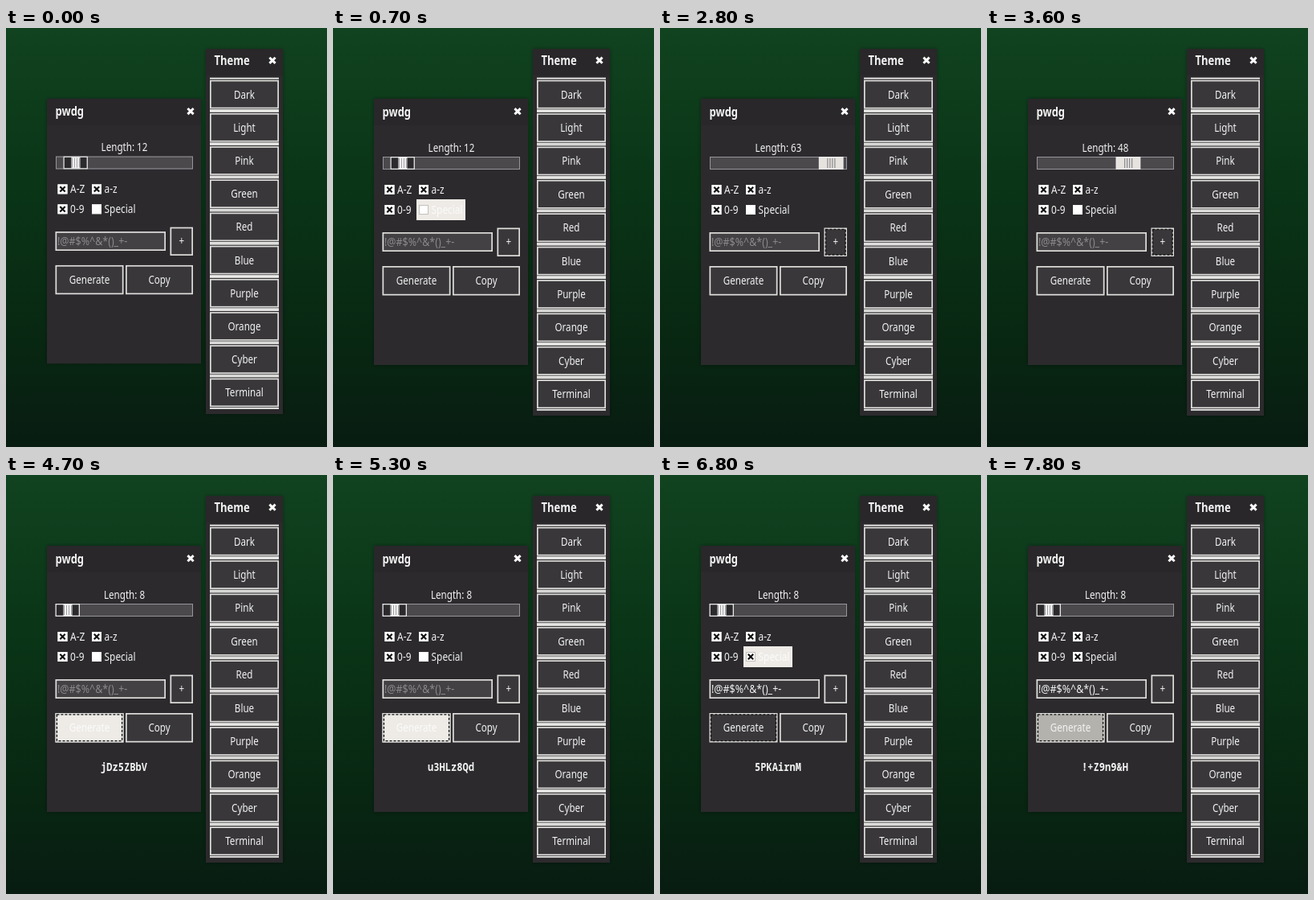
An HTML page with a canvas that plays this animation: 400 px wide and 521 px high, repeating every 8000 ms.

```html
<!DOCTYPE html>
<html lang="en">
<head>
<meta charset="utf-8">
<title>Password generator</title>
<style>
html, body { margin: 0; width: 100%; height: 100%; overflow: hidden; background: #07210f; }
canvas { display: block; width: 400px; height: 521px; }
</style>
</head>
<body>
<canvas id="stage"></canvas>
<script>
const W = 400, H = 521, LOOP = 8000, STEP = 100;
const SQUEEZE = 0.83; // the whole screen is narrowed, so all type is too
const SANS = '"Noto Sans", sans-serif';
const MONO = '"Noto Sans Mono", monospace';
const INK = '#f2f2f2', EDGE = '#dededb', PANEL = '#2c2a2d', BUTTON = '#39373a';
const LIT = '#eeebe7', PRESSED = '#b4b2ad';
const THEMES = ['Dark', 'Light', 'Pink', 'Green', 'Red', 'Blue', 'Purple', 'Orange', 'Cyber', 'Terminal'];

const canvas = document.getElementById('stage');
const ctx = canvas.getContext('2d');
const dpr = window.devicePixelRatio || 1;
canvas.width = W * dpr;
canvas.height = H * dpr;

// [time, slider value], linear between points
const SLIDE = [[0, 12], [1500, 12], [1800, 28], [2000, 37], [2300, 52], [2700, 64],
  [3100, 60], [3400, 51], [3600, 48], [3700, 34], [3800, 34], [3900, 16], [4000, 8]];

// [time, password], each held until the next
const PASSWORDS = [[0, ''], [4700, 'jDz5ZBbV'], [4900, 'q7RmT2xK'], [5100, 'Wb4nYc9E'],
  [5300, 'u3HLz8Qd'], [5500, 'Gk6vPs1J'], [5700, '5PKAirnM'], [7300, 'r&4X_bT7'], [7500, '!+Z9n9&H']];

const between = (t, a, b) => t >= a && t < b;

function sliderAt(t) {
  const i = SLIDE.findIndex(p => p[0] > t);
  if (i < 0) return SLIDE[SLIDE.length - 1][1];
  const [t0, v0] = SLIDE[i - 1], [t1, v1] = SLIDE[i];
  return Math.round(v0 + (v1 - v0) * (t - t0) / (t1 - t0));
}

function buttonState(t) {
  if (between(t, 4600, 4700) || between(t, 7200, 7300) || between(t, 7400, 7500) || t >= 7800) return 'pressed';
  if (between(t, 4800, 5700) && t % 200 === 0) return 'pressed';
  if (between(t, 4400, 5900) || t >= 7100) return 'hover';
  return '';
}

function fill(x, y, w, h, color) {
  ctx.fillStyle = color;
  ctx.fillRect(x, y, w, h);
}

function box(x, y, w, h, color, edge = EDGE, line = 1.7) {
  fill(x, y, w, h, color);
  ctx.strokeStyle = edge;
  ctx.lineWidth = line;
  ctx.strokeRect(x + line / 2, y + line / 2, w - line, h - line);
}

function text(str, x, y, { size = 14, weight = 400, font = SANS, color = INK, align = 'left' } = {}) {
  ctx.save();
  ctx.translate(x, y);
  ctx.scale(SQUEEZE, 1);
  ctx.font = `${weight} ${size}px ${font}`;
  ctx.textAlign = align;
  ctx.fillStyle = color;
  ctx.fillText(str, 0, 0);
  ctx.restore();
}

function cross(x, y, r, width, color) {
  ctx.strokeStyle = color;
  ctx.lineWidth = width;
  ctx.beginPath();
  ctx.moveTo(x - r, y - r);
  ctx.lineTo(x + r, y + r);
  ctx.moveTo(x + r, y - r);
  ctx.lineTo(x - r, y + r);
  ctx.stroke();
}

function panel(x, y, w, h, bar, title, baseline) {
  ctx.save();
  ctx.shadowColor = 'rgba(0,0,0,.35)';
  ctx.shadowBlur = 5 * dpr;
  fill(x, y, w, h, PANEL);
  ctx.restore();
  fill(x, y, w, bar, '#29272a');
  text(title, x + 10.5, baseline, { size: 15.7, weight: 700 });
  cross(x + w - 13, baseline - 5.8, 3.6, 3, '#fff');
}

function button(x, y, w, h, label, state = '', focus = false) {
  const color = state === 'hover' ? LIT : state === 'pressed' ? PRESSED : BUTTON;
  box(x, y, w, h, color);
  if (focus) {
    ctx.save();
    ctx.setLineDash([3, 2]);
    ctx.strokeStyle = '#111';
    ctx.lineWidth = 1.4;
    ctx.strokeRect(x + 1.9, y + 1.9, w - 3.8, h - 3.8);
    ctx.restore();
  }
  text(label, x + w / 2, y + h / 2 + 5, { align: 'center', color: state === 'hover' ? '#fbfbf9' : INK });
}

function check(x, y, label, on, hover = false) {
  if (hover) fill(x - 9, y - 13, 61, 26, LIT);
  box(x - 6, y - 6, 12, 12, '#fff', hover ? '#c4c1bc' : '#f4f4f4', 1);
  if (on) cross(x, y, 3.2, 2.2, '#111');
  text(label, x + 9.6, y + 5, { size: 14.3, color: hover ? '#fbfbf9' : INK });
}

function slider(value, active) {
  box(62, 160, 171, 16, '#4b494c', '#96959a', 1);
  const x = 61.5 + (value - 8) * 2.48;
  box(x, 160, 30.5, 16, active ? '#e6e3df' : PANEL, '#e8e8e8', 1.3);
  if (!active) fill(x + 10, 161, 11, 14, '#f2f2f2');
  for (let i = 0; i < 4; i++) fill(x + 10.5 + i * 3, 162, 1, 12, active ? '#77757a' : '#a09ea2');
}

function backdrop() {
  const down = ctx.createLinearGradient(0, 0, 0, H);
  down.addColorStop(0, '#114320');
  down.addColorStop(0.35, '#0a3617');
  down.addColorStop(0.75, '#082712');
  down.addColorStop(1, '#081c12');
  fill(0, 0, W, H, down);
}

function mainWindow(t) {
  const special = t >= 6700;
  const length = sliderAt(t);
  panel(51, 88, 192, 331, 33, 'pwdg', 109.5);
  text('Length: ' + length, 147.5, 153.5, { align: 'center' });
  slider(length, between(t, 1500, 4200));

  check(70.5, 201, 'A-Z', true);
  check(113, 201, 'a-z', true);
  check(70.5, 226, '0-9', true);
  check(113, 226, 'Special', special, between(t, 500, 1000) || between(t, 6300, 6900));

  box(61.5, 254, 137.5, 24, special ? BUTTON : '#434144');
  text('!@#$%^&*()_+-', 64, 270.5, { size: 15, color: special ? INK : '#8b898c' });
  button(204.5, 248.5, 28.5, 35.5, '+', between(t, 1100, 1400) ? 'hover' : '', between(t, 1200, 4600));

  button(61.5, 296, 85, 36.5, 'Generate', buttonState(t), t >= 4600);
  button(149, 296, 84, 36.5, 'Copy');

  const password = PASSWORDS.filter(p => p[0] <= t).pop()[1];
  text(password, 147, 368, { size: 14.5, weight: 700, font: MONO, align: 'center' });
}

function themeWindow() {
  panel(249, 26, 96, 456, 33, 'Theme', 46);
  THEMES.forEach((name, i) => {
    const y = 61.7 + i * 41.4;
    fill(254, y, 86, 1.8, '#f0f0ee');
    button(254, y + 3, 86, 35.8, name);
    fill(254, y + 39.6, 86, 1.8, '#f0f0ee');
  });
}

function draw(now) {
  const t = Math.floor((now % LOOP) / STEP) * STEP;
  ctx.setTransform(dpr, 0, 0, dpr, 0, 0);
  backdrop();
  // the view settles a touch taller just after the start
  const stretch = 0.9952 + 0.0048 * Math.min(1, t / 300);
  ctx.translate(0, 70 * (1 - stretch));
  ctx.scale(1, stretch);
  mainWindow(t);
  themeWindow();
}

const start = performance.now();
function tick() {
  draw(performance.now() - start);
  requestAnimationFrame(tick);
}
tick();
</script>
</body>
</html>
```
